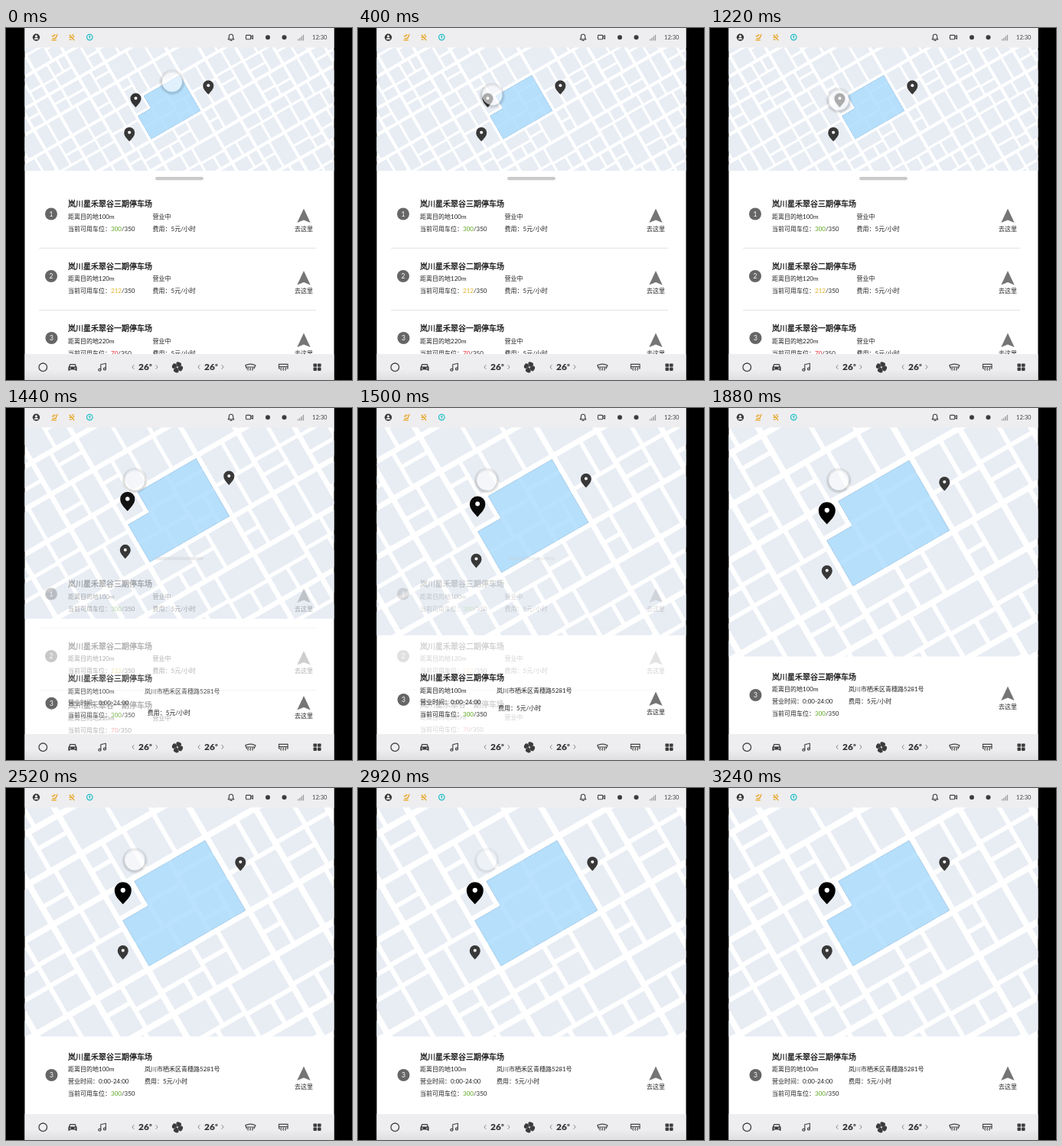
Write an HTML page that moves like this. It is 452 px wide and 461 px high and loops after 3260 ms.

```html
<!DOCTYPE html>
<html lang="zh-CN">
<head>
<meta charset="utf-8">
<title>停车场地图</title>
<style>
html, body { margin: 0; width: 100%; height: 100%; overflow: hidden; background: #000; }
svg { display: block; width: 100vw; height: 100vh; }
text { font-family: Lato, "Noto Sans CJK SC", "Noto Sans CJK", sans-serif; fill: #222; }
.title { fill: #111; stroke: #111; stroke-width: .28; }
.line { fill: none; stroke: #444; stroke-width: 1.15; stroke-linecap: round; stroke-linejoin: round; }
.dark { fill: #3c3c3c; }
</style>
</head>
<body>
<svg id="stage" viewBox="0 0 452 461"></svg>
<script>
const LOOP = 3260;
const TILT = "rotate(-30)";
const NAME = "岚川星禾翠谷";
const PANEL = 'x="24.5" width="404"';

const mix = (a, b, p) => a + (b - a) * p;
const clamp = v => Math.max(0, Math.min(1, v));
const span = (t, from, length) => clamp((t - from) / length);
const easeOut = p => 1 - (1 - p) ** 2;
const easeInOut = p => p < .5 ? 4 * p ** 3 : 1 - 4 * (1 - p) ** 3;

// y is the middle of the line
function label(x, y, content, size = 8, attrs = "") {
  return `<text x="${x}" y="${y + size * .36}" font-size="${size}" ${attrs}>${content}</text>`;
}
const heading = (x, y, content) => label(x, y, content, 10, 'class="title"');
const spaces = (n, color) => `当前可用车位：<tspan fill="${color}">${n}</tspan>/350`;
const group = (id, content) => `<g id="${id}">${content}</g>`;
const at = (x, y, content) => `<g transform="translate(${x} ${y})">${content}</g>`;

const badge = n => `<circle r="8" fill="#666"/>` +
  label(0, 0, n, 8.5, 'text-anchor="middle" style="fill:#fff"');
const arrow = '<path d="M0-9.5L8.7 9 0 5.6-8.7 9Z" fill="#757575"/>' +
  label(0, 17, "去这里", 8, 'text-anchor="middle"');
const pin = '<path d="M0 9.6C-2.6 6.4-7 3-7-2A7 7 0 0 1 7-2C7 3 2.6 6.4 0 9.6Z"/>' +
  '<circle cy="-2.2" r="2" fill="#fff"/>';

// Street blocks: large cells cut in two until they are small enough
function cityBlocks() {
  let seed = 29;
  const rnd = () => (seed = seed * 16807 % 2147483647) / 2147483647;
  let path = "";
  function cut(x, y, w, h) {
    if (Math.max(w, h) < 50 + rnd() * 28) {
      path += `M${x + 3} ${y + 3}h${w - 6}v${h - 6}h${6 - w}z`;
      return;
    }
    const k = .38 + rnd() * .24;
    if (w > h) {
      cut(x, y, w * k, h);
      cut(x + w * k, y, w * (1 - k), h);
    } else {
      cut(x, y, w, h * k);
      cut(x, y + h * k, w, h * (1 - k));
    }
  }
  const us = [-480, -395, -318, -228, -149, 4, 78, 160, 245, 320, 400];
  const vs = [-280, -196, -125, -66, -4, 109, 176, 262, 340, 420];
  for (let i = 0; i < us.length - 1; i++) {
    for (let j = 0; j < vs.length - 1; j++) {
      const w = us[i + 1] - us[i], h = vs[j + 1] - vs[j];
      if (us[i] === -149 && vs[j] === -4) {
        cut(-149, -4, 39, 37);
        cut(-110, -4, 56, 37);
        cut(-54, -4, 58, 60);
        cut(-149, 33, 95, 38);
        cut(-149, 71, 95, 38);
        cut(-54, 56, 58, 53);
      } else {
        cut(us[i] + 1, vs[j] + 1, w - 2, h - 2);
      }
    }
  }
  return path;
}

function listItem(y, n, phase, distance, free, color) {
  return at(59, y + 13, badge(n)) + heading(81, y, `${NAME}${phase}期停车场`) +
    label(81, y + 16.5, `距离目的地${distance}m`) + label(191.5, y + 16.5, "营业中") +
    label(81, y + 32.5, spaces(free, color)) + label(191.5, y + 32.5, "费用：5元/小时") +
    at(389, y + 15.5, arrow);
}

function statusBar() {
  const orange = 'class="line" style="stroke:#e9a21d;stroke-width:1.3"';
  return `<rect ${PANEL} height="25.5" fill="#eeeef0"/>` +
    at(39.5, 12.3, '<circle r="4.7" class="dark"/><circle cy="-1.4" r="1.6" fill="#eee"/><path d="M-2.8 2.8a2.8 2.2 0 0 1 5.6 0z" fill="#eee"/>') +
    at(63.5, 12.3, `<path ${orange} d="M3.5-3.8L1.4 1.3H-2.6M-3.6 3.6H2M-3.2-1.6h2.6M-1-3.2h1.8"/>`) +
    at(86, 12.3, `<path ${orange} d="M-2.8-3L2.8 3.4M-3 0h1.6M-2.8 2.8h2M.4-3.2h2M1.6-.8h1.2"/>`) +
    at(109.3, 12.1, '<circle r="3.8" fill="none" stroke="#22bfc5" stroke-width="1.2"/><path d="M0-1.8V2M-1.2-.4L0-1.8 1.2-.4" fill="none" stroke="#22bfc5"/>') +
    at(294, 12.3, '<path class="line" d="M-3.8 2.5H3.8L2.7 1V-1.2a2.7 2.9 0 0 0-5.4 0V1zM-1 4.2H1"/>') +
    at(318, 12, '<rect class="line" x="-4.5" y="-2.7" width="6.3" height="5.4" rx="1"/><path class="line" d="M2-.8L4.5-2.2V2.2L2 .8"/>') +
    at(342, 12.3, '<circle r="3" class="dark"/>') +
    at(363.5, 12.3, '<circle r="3" class="dark"/>') +
    at(385, 12.5, '<path d="M-3.5 4V2M-1.2 4V.4M1.1 4V-1.5M3.4 4V-3.6" stroke="#999" stroke-width="1.3"/>') +
    label(400, 12.7, "12:30", 7.6, 'style="fill:#444"');
}

function dial(x) {
  return at(x, 444, '<path class="line" style="stroke:#888;stroke-width:1" d="M-15-2.5l-2 2.5 2 2.5M14-2.5l2 2.5-2 2.5"/>') +
    label(x - 9, 444, '26<tspan font-size="9" dy="-1.2">°</tspan>', 12, 'font-weight="900" style="fill:#333"');
}

function dock() {
  const blades = [20, 110, 200, 290].map(a =>
    `<path transform="rotate(${a})" class="dark" d="M0 0C-.6-2.6-3.6-2.6-3.4-5S0-7.6 2.4-6.6 3.4-1.6 0 0z"/>`).join("");
  const waves = '<path class="line" d="M-3 1v1.2q-1 1 0 2M0 1v1.2q-1 1 0 2M3 1v1.2q-1 1 0 2"/>';
  return `<rect ${PANEL} y="427" height="34" fill="url(#dockFill)"/>` +
    at(48.3, 444.3, '<circle r="5.3" class="line" style="stroke-width:1.3"/>') +
    at(87, 444.3, '<path class="dark" d="M-3.6-4.2H3.6L5-1 5.6 0V4.5H3.6V3.2H-3.6V4.5H-5.6V0L-5-1z"/><path d="M-2.9-3H2.9L3.7-.9H-3.7z" fill="#ededef"/><path d="M-4 1.3h1.8M4 1.3H2.2" stroke="#ededef"/>') +
    at(126, 444.3, '<path class="line" d="M-2.2 3.3V-3.6L4.4-5V2"/><ellipse cx="-3.6" cy="3.5" rx="1.6" ry="1.4" class="line"/><ellipse cx="3" cy="2.2" rx="1.6" ry="1.4" class="line"/>') +
    dial(182) + at(224, 444.3, blades + '<circle r="1" fill="#ededef"/>') + dial(268) +
    at(319.3, 444, '<path class="line" d="M-4.8 2L-6.6-2.2Q0-5.4 6.6-2.2L4.8 2M-5.6 0H5.6"/>' + waves) +
    at(362.3, 444, '<path class="line" d="M-4.8 2H-5.8V-3.6H5.8V2H4.8M-5.6-.4H5.6"/>' + waves) +
    at(406.5, 444, [[-5, -4.6], [.5, -4.6], [-5, .6], [.5, .6]].map(([x, y]) =>
      `<rect class="dark" x="${x}" y="${y}" width="4.6" height="4.3" rx=".8"/>`).join(""));
}

const stage = document.getElementById("stage");
stage.innerHTML = `
<defs>
  <clipPath id="mapClip"><rect id="mapArea" ${PANEL} y="25" height="162"/></clipPath>
  <clipPath id="listClip"><rect ${PANEL} y="25" height="402"/></clipPath>
  <radialGradient id="shade">
    <stop offset=".7" stop-color="#000" stop-opacity="0"/>
    <stop offset=".76" stop-color="#000" stop-opacity=".17"/>
    <stop offset="1" stop-color="#000" stop-opacity="0"/>
  </radialGradient>
  <linearGradient id="dockFill" x2="0" y2="1">
    <stop offset=".6" stop-color="#eeeef0"/>
    <stop offset="1" stop-color="#dfdfe1"/>
  </linearGradient>
</defs>
<rect width="452" height="461" fill="#000"/>
<rect ${PANEL} height="461" fill="#fff"/>
<g clip-path="url(#mapClip)">
  ${group("city", `<path transform="${TILT}" d="${cityBlocks()}" fill="#e8edf4"/>
    <path transform="${TILT}" d="M0 0V105.4H-145.2V37H-106.4V0Z" fill="#abdcfe" fill-opacity=".82"
      stroke="#74b2da" stroke-width=".7" stroke-dasharray="1.6 1.2" vector-effect="non-scaling-stroke"/>`)}
  ${group("pinEast", pin)}${group("pinSouth", pin)}${group("pinMain", pin)}
</g>
<g clip-path="url(#listClip)">
  ${group("list", `<rect x="195" y="195" width="63" height="4.2" rx="2.1" fill="#c9c9c9"/>
    ${listItem(230.5, 1, "三", 100, 300, "#5aa51c")}
    <path d="M43 288.3H405M43 369.6H405" stroke="#e2e2e2"/>
    ${listItem(312, 2, "二", 120, 212, "#dfb02a")}`)}
  ${group("lastItem", heading(81, 393.5, `${NAME}一期停车场`) + label(81, 410, "距离目的地220m") +
    label(191.5, 410, "营业中") + label(81, 426, spaces(70, "#e0262b")))}
  ${group("detail", heading(81, 352, `${NAME}三期停车场`) + label(81, 368.5, "距离目的地100m") +
    label(181, 368.5, "岚川市栖禾区青穗路5281号") + label(81, 384.3, "营业时间：0:00-24:00") +
    label(81, 400, spaces(300, "#5aa51c")))}
  ${group("fee", label(0, 0, "费用：5元/小时"))}
  ${group("badge", badge(3))}
  ${group("arrow", arrow)}
</g>
${statusBar()}${dock()}
${group("touch", '<circle cy="1.5" r="17.5" fill="url(#shade)"/><circle r="13.4" fill="#fbfbfe" fill-opacity=".6"/>')}`;

const el = {};
stage.querySelectorAll("g[id]").forEach(g => el[g.id] = g);
const mapArea = document.getElementById("mapArea");
el.pinEast.setAttribute("fill", "#383838");
el.pinSouth.setAttribute("fill", "#383838");

function place(g, x, y, scale = 1) {
  g.setAttribute("transform", `translate(${x} ${y}) scale(${scale})`);
}
function slide(g, [x0, y0], [x1, y1], p, scale) {
  place(g, mix(x0, x1, p), mix(y0, y1, p), scale);
}
const fade = (g, v) => g.setAttribute("opacity", v);

function draw(t) {
  const open = easeOut(span(t, 1280, 400));
  mapArea.setAttribute("height", mix(162, 300.5, open));
  slide(el.city, [227, 62], [260, 69], open, mix(.508, 1, open));
  slide(el.pinEast, [264.3, 77.5], [306.3, 99], open);
  slide(el.pinSouth, [161.2, 139], [152.8, 215], open);
  slide(el.pinMain, [169.5, 94.3], [152.8, 137.3], open, mix(1, 1.57, open));
  const tone = Math.round(mix(51, 0, open));
  el.pinMain.setAttribute("fill", `rgb(${tone},${tone},${tone})`);

  fade(el.list, 1 - open);
  fade(el.lastItem, 1 - open);
  place(el.lastItem, 0, -6 * open);
  fade(el.detail, clamp(open * 1.25));
  place(el.detail, 0, 6 * (1 - open));
  slide(el.fee, [191.5, 426], [181, 384.3], open);
  slide(el.badge, [59.5, 406], [59.5, 376], open);
  slide(el.arrow, [389, 409], [389, 374], open);

  const move = easeInOut(span(t, 0, 600));
  place(el.touch, mix(217, 168.2, move), mix(69.7, 93.7, move ** 2));
  fade(el.touch, 1 - span(t, 2700, 460));
}

const start = performance.now();
function tick() {
  draw((performance.now() - start) % LOOP);
  requestAnimationFrame(tick);
}
tick();
</script>
</body>
</html>
```
